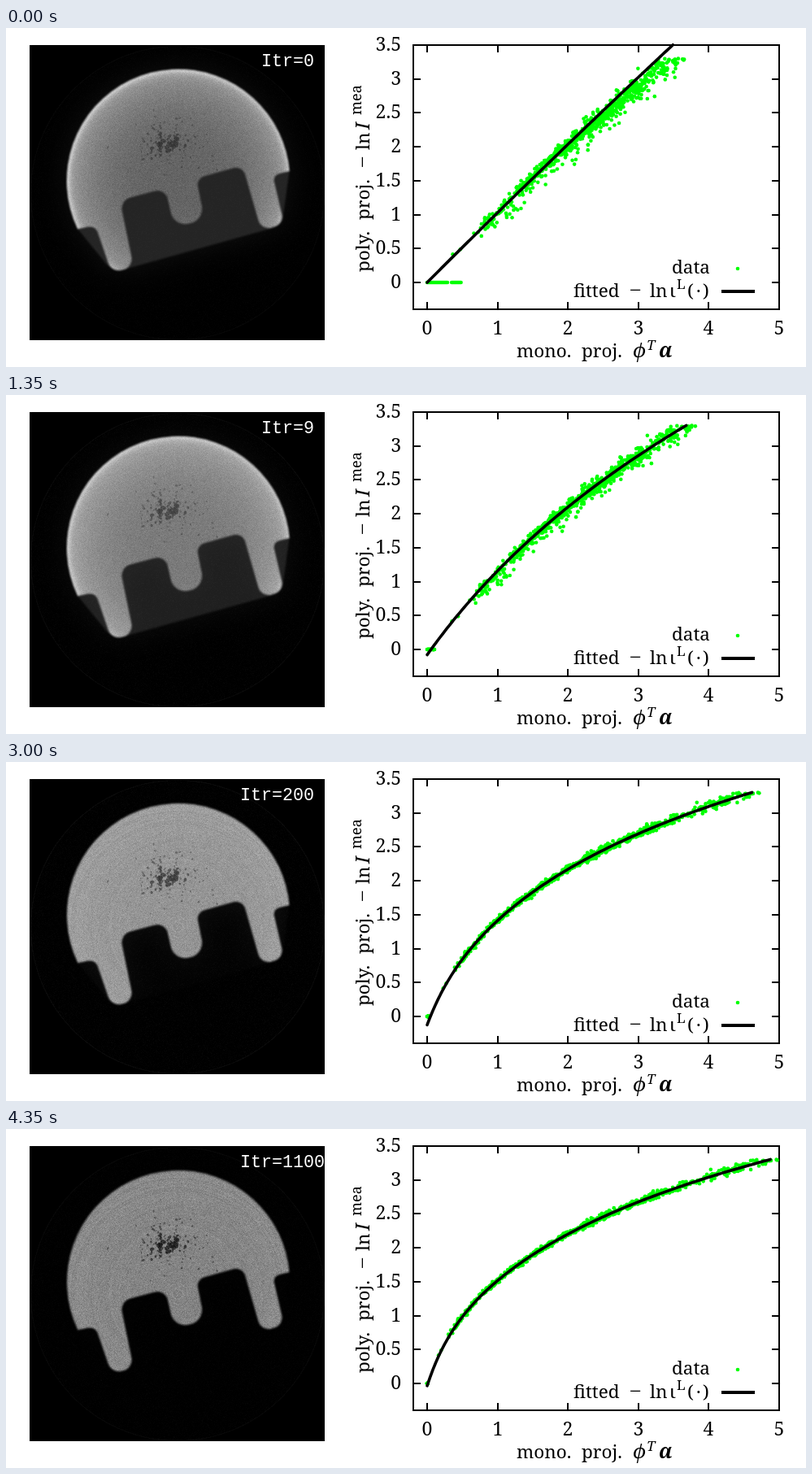
An HTML page with a canvas for the animation above (4500 ms loop, 984 by 417 pixels).

```html
<!DOCTYPE html>
<html lang="en">
<head>
<meta charset="utf-8">
<title>Reconstruction and fitted curve</title>
<style>
  html, body { margin: 0; width: 100%; height: 100%; overflow: hidden; background: #fff; }
  canvas { display: block; }
</style>
</head>
<body>
<canvas id="stage" width="984" height="417"></canvas>
<script>
const ctx = document.getElementById('stage').getContext('2d');
const STEP = 150, COUNT = 30;
const SCAN = { x: 29, y: 21, size: 363 };
const SERIF = '"Noto Serif", serif';
const MONO = '"Liberation Mono", monospace';

function random(seed) {
  return () => {
    seed = (seed + 0x6D2B79F5) | 0;
    let t = Math.imul(seed ^ (seed >>> 15), 1 | seed);
    t = (t + Math.imul(t ^ (t >>> 7), 61 | t)) ^ t;
    return ((t ^ (t >>> 14)) >>> 0) / 4294967296;
  };
}
const gauss = rnd => rnd() + rnd() + rnd() + rnd() + rnd() + rnd() - 3;
const mix = (a, b, t) => a + (b - a) * t;

function iteration(step) {
  if (step < 10) return step;
  return step < 20 ? (step - 9) * 10 : (step - 18) * 100;
}

// grow: overall convergence, 0 to 1; warm: fades out over the first nine iterations.
function progress(step) {
  const n = iteration(step);
  return { grow: n / (n + 60), warm: Math.max(0, 1 - n / 9) };
}

// ---- Curves and data ----
// A steep start plus a logarithm, through (0, base) and (end, top).
function curve(grow, top, extraBend) {
  const end = 3.49 + 1.46 * grow;
  const base = -.7 * grow * (1 - grow);
  const kink = .4 * grow ** 3;
  const bend = .02 + 2.9 * grow - 1.8 * grow ** 2 + extraBend;
  const scale = (top - base - kink) / Math.log(1 + bend * end);
  const f = x => base + kink * (1 - Math.exp(-4 * x)) + scale * Math.log(1 + bend * x);
  return { f, end };
}

function fitted({ grow, warm }) {
  const dip = Math.sin(Math.PI * warm);
  return curve(grow, 3.3 + .2 * warm - .35 * dip, .35 * dip);
}

const trend = ({ grow, warm }) => curve(grow, 3.3, .1 * warm);

function inverse(f, y) {
  let lo = 0, hi = 5.2;
  for (let i = 0; i < 18; i++) {
    const mid = (lo + hi) / 2;
    if (f(mid) < y) lo = mid; else hi = mid;
  }
  return lo;
}

const points = [];
{
  const rnd = random(41);
  const add = (n, from, to, tailChance) => {
    for (let i = 0; i < n; i++) {
      points.push({
        y: mix(from, to, rnd()),
        side: gauss(rnd) * 1.4,
        tail: rnd() < tailChance ? -1.25 * Math.log(1 - rnd() * .95) : 0
      });
    }
  };
  add(5, .4, .8, .6);
  add(85, .78, 1.4, .7);
  add(430, 1.4, 2.45, .28);
  add(190, 2.4, 2.85, .3);
  add(140, 2.8, 3.3, .15);
}

const px = x => 518 + x * 86.6;
const py = y => 313 - y * 83.5;

function dot(x, y) {
  ctx.fillStyle = '#0f0';
  ctx.beginPath();
  ctx.arc(x, y, 2.3, 0, 7);
  ctx.fill();
}

function drawData(step) {
  const state = progress(step), { grow, warm } = state;
  const data = trend(state), fit = fitted(state);
  const span = .12 * (1 - grow) + .36 * warm ** 4;
  for (let i = 0; i <= 40; i++) {
    if (i < 25 || i > 28) dot(px(i / 40 * span), py(0));
  }
  for (const p of points) {
    const x = inverse(data.f, p.y);
    const spread = (.02 + .006 * x * x) * (1.2 - .4 * grow);
    dot(px(x + spread * p.side + .1 * (1 - grow) ** 2 * p.tail), py(p.y));
  }
  ctx.beginPath();
  for (let i = 0; i <= 120; i++) {
    const x = fit.end * i / 120;
    ctx.lineTo(px(x), py(fit.f(x)));
  }
  ctx.strokeStyle = '#000';
  ctx.lineWidth = 3.6;
  ctx.lineCap = ctx.lineJoin = 'round';
  ctx.stroke();
}

// ---- Axes and labels ----
function text(str, x, y, size = 22.5, align = 'left', style = '', family = SERIF) {
  ctx.font = `${style} ${size}px ${family}`;
  ctx.textAlign = align;
  ctx.fillText(str, x, y);
}

function line(x1, y1, x2, y2, width = 2) {
  ctx.lineWidth = width;
  ctx.beginPath();
  ctx.moveTo(x1, y1);
  ctx.lineTo(x2, y2);
  ctx.stroke();
}

function drawAxes() {
  const L = 501, R = 951, T = 21, B = 346, tick = 9;
  ctx.strokeStyle = ctx.fillStyle = '#000';
  ctx.lineCap = 'butt';
  ctx.lineJoin = 'miter';
  ctx.lineWidth = 2;
  ctx.strokeRect(L, T, R - L, B - T);
  for (let i = 0; i <= 5; i++) {
    const x = Math.round(px(i));
    line(x, B, x, B - tick);
    line(x, T, x, T + tick);
    text(i, x, 377, 23, 'center');
  }
  for (let i = 0; i <= 7; i++) {
    const y = Math.round(py(i / 2));
    line(L, y, L + tick, y);
    line(R, y, R - tick, y);
    text(i / 2, 486, y + 7, 23, 'right');
  }

  text('mono.', 628, 405);
  text('proj.', 708, 405);
  text('ϕ', 771, 405, 24, 'left', 'italic');
  text('T', 788, 396, 17, 'left', 'italic');
  text('α', 803, 405, 25, 'left', 'italic bold');

  ctx.save();
  ctx.translate(447, 300);
  ctx.rotate(-Math.PI / 2);
  text('poly.', 0, 0);
  text('proj.', 64, 0);
  text('−', 128, 0, 26);
  text('ln', 150, 0);
  text('I', 175, 0, 24, 'left', 'italic');
  text('mea', 193, -10, 18);
  ctx.restore();

  text('data', 866, 302, 22.5, 'right');
  text('fitted', 698, 331);
  text('−', 767, 331, 26);
  text('ln', 792, 331);
  text('ι', 816, 331);
  text('L', 825, 321, 17);
  text('(', 838, 331);
  text('·', 849, 331);
  text(')', 857, 331);
  line(880, 324, 921, 324, 4);
  dot(900, 296);
}

// ---- Scan ----
const CX = 212, CY = 188, RADIUS = 137;

// Corner points of the lower edge with their rounding radius.
const EDGE = [
  [328, 181, 8], [342, 241, 13], [314, 249, 13], [291, 169, 12], [234, 185, 11],
  [244, 235, 18], [207, 246, 18], [196, 197, 13], [140, 212, 14],
  [157, 294, 14], [130, 301, 14], [110, 243, 10]
];

function dome(c) {
  c.beginPath();
  c.arc(CX, CY, RADIUS, Math.atan2(59, -123), Math.atan2(-12, 137));
}

function bodyPath(c) {
  dome(c);
  EDGE.forEach(([x, y, r], i) => {
    const next = EDGE[i + 1] || [89, 247];
    c.arcTo(x, y, next[0], next[1], r);
  });
  c.lineTo(89, 247);
  c.fill();
}

function hullPath(c) {
  dome(c);
  for (const [x, y] of [[340, 237], [328, 246], [145, 297], [134, 298], [124, 291]]) c.lineTo(x, y);
  c.fill();
}

function mask(draw, blur) {
  const cv = document.createElement('canvas');
  cv.width = cv.height = SCAN.size;
  const c = cv.getContext('2d');
  c.translate(-SCAN.x, -SCAN.y);
  c.filter = `blur(${blur}px)`;
  draw(c);
  const data = c.getImageData(0, 0, SCAN.size, SCAN.size).data;
  return Float32Array.from({ length: SCAN.size ** 2 }, (_, i) => data[i * 4 + 3] / 255);
}

// Large pores sit in the middle, small ones scatter outwards.
function pores(c) {
  const rnd = random(9), count = 170;
  for (let i = 0; i < count; i++) {
    const u = i / count, size = .8 + 3.2 * (1 - u) ** 12 + rnd() * .9;
    c.globalAlpha = mix(.85, .4, Math.sqrt(u));
    c.beginPath();
    c.ellipse(198 + gauss(rnd) * mix(14, 42, u), 141 + gauss(rnd) * mix(7, 30, u),
      size, size * mix(.5, 1, rnd()), rnd() * 3, 0, 7);
    c.fill();
  }
}

const body = mask(bodyPath, .8);
const near = mask(bodyPath, 16);
const hull = mask(hullPath, 1);
const halo = mask(hullPath, 18);
const pore = mask(pores, .6);

function noise(length, seed) {
  const rnd = random(seed);
  return Float32Array.from({ length }, () => gauss(rnd));
}
const grain = noise(SCAN.size ** 2, 77);
const rings = noise(300, 5);

function renderScan(step) {
  const { grow: g } = progress(step), rest = (1 - g) ** 2;
  const core = 100 + 190 * g - 165 * g * g;
  const edge = core + 8 + 48 * rest;
  const gap = 36 * (1 - g * g) ** 1.5;
  const poreDepth = .46 + .4 * g ** 4;
  const grit = 8 + 5 * g * g;
  const field = 2.5 + 8 * g * (1 - g);

  const n = SCAN.size, cv = document.createElement('canvas');
  cv.width = cv.height = n;
  const c = cv.getContext('2d');
  const img = c.createImageData(n, n);
  for (let y = 0, i = 0; y < n; y++) {
    for (let x = 0; x < n; x++, i++) {
      const t = Math.hypot(x + SCAN.x - CX, y + SCAN.y - CY) / RADIUS;
      const q = Math.hypot(x - 181.5, y - 181.5);
      let solid = mix(core, edge, t ** 3) + 75 * rest * t ** 40;
      solid *= 1 - pore[i] * poreDepth;
      solid += grain[i] * grit + rings[q | 0] * 4 * g * (q < 9 ? 3 : 1);
      let air = gap * hull[i] * mix(1, near[i] * 1.6, g) + 16 * rest * halo[i] * (1 - hull[i]);
      if (q < 181) air += Math.max(0, grain[i]) * field;
      if (Math.abs(q - 180.5) < .6) air += field * 2;
      img.data.fill(mix(air, solid, body[i]), i * 4, i * 4 + 3);
      img.data[i * 4 + 3] = 255;
    }
  }
  c.putImageData(img, 0, 0);
  return cv;
}

const scans = Array.from({ length: COUNT }, (_, i) => renderScan(i));

function draw(step) {
  ctx.fillStyle = '#fff';
  ctx.fillRect(0, 0, 984, 417);
  ctx.drawImage(scans[step], SCAN.x, SCAN.y);
  const label = 'Itr=' + iteration(step);
  text(label, 379 - Math.min(label.length, 7) * 13, 47, 21.7, 'left', '', MONO);
  drawAxes();
  drawData(step);
}

const start = performance.now();
let shown = -1;
function tick() {
  const step = Math.floor((performance.now() - start) / STEP) % COUNT;
  if (step !== shown) draw(shown = step);
  requestAnimationFrame(tick);
}
tick();
</script>
</body>
</html>
```
